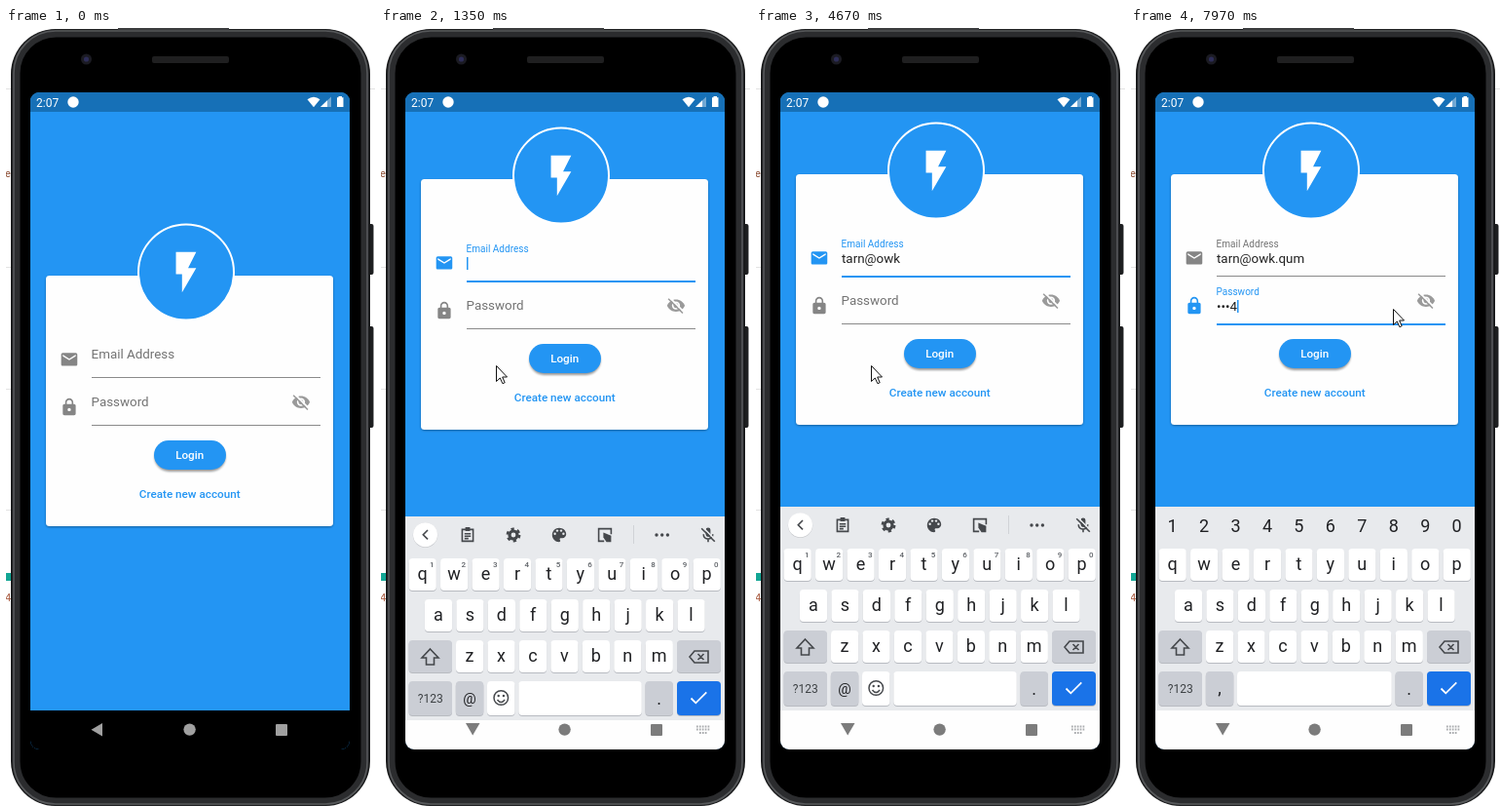
An HTML page for the animation above (8 s loop, 379x798 px).

```html
<!DOCTYPE html>
<html lang="en">
<head>
<meta charset="utf-8">
<title>Login form</title>
<style>
  html, body { margin: 0; width: 100%; height: 100%; overflow: hidden; background: #fff; }
  svg { display: block; width: 379px; height: 798px; font-family: Roboto, "Noto Sans", sans-serif; }
  .mid { text-anchor: middle; }
  .field { font-size: 13.36px; }
  .btn { font-size: 11.7px; font-weight: 500; }
  .key { font-size: 18px; fill: #202124; }
  .hint { font-size: 8px; font-weight: 500; fill: #5f6368; }
  .tool { fill: #45484c; }
  .line { fill: none; stroke: #45484c; stroke-width: 2; }
</style>
</head>
<body>
<svg viewBox="0 0 379 798">
  <defs>
    <clipPath id="screen"><rect x="25" y="66" width="328" height="674" rx="9"/></clipPath>
    <filter id="soft" x="-20%" y="-20%" width="140%" height="160%"><feGaussianBlur stdDeviation="1.1"/></filter>
  </defs>

  <!-- page behind the phone -->
  <path d="M0 62.5H379M0 245.5H8M0 370.5H8M0 494.5H8" stroke="#e2e2e2"/>
  <rect y="559" width="7" height="8" fill="#12a594"/>
  <text x="-1" y="153" font-size="11" fill="#8a4a30">e</text>
  <text x="-1" y="588" font-size="11" fill="#a4553a">4</text>

  <!-- phone -->
  <rect x="371" y="201" width="6.5" height="52" rx="2" fill="#1d1e20"/>
  <rect x="371" y="306" width="6.5" height="104" rx="2" fill="#1d1e20"/>
  <rect x="5" y="1" width="369" height="797" rx="46" fill="#161718"/>
  <rect x="10.5" y="5.5" width="358" height="788" rx="41" fill="#000" stroke="#2b2c2e" stroke-width="8"/>
  <rect x="8" y="3" width="363" height="793" rx="43" fill="none" stroke="#56585a" stroke-width="1.6"/>
  <rect x="115" y="0" width="114" height="2" fill="#3a3b3d"/>
  <rect x="150" y="29" width="79" height="7" rx="2" fill="#1f1f20"/>
  <circle cx="82.5" cy="32" r="5.5" fill="#1b1b22"/>
  <circle cx="82.5" cy="32" r="2.6" fill="#2d2d58"/>

  <g clip-path="url(#screen)">
    <rect x="25" y="66" width="328" height="674" fill="#2395f3"/>
    <rect x="25" y="66" width="328" height="20" fill="#1670b7"/>
    <g fill="#fff">
      <text x="31" y="80.5" font-size="12">2:07</text>
      <circle cx="69" cy="76" r="5.7"/>
      <path d="M309.5 73.3Q316 68 322.5 73.3L316 81.3Z"/>
      <path d="M334 70.5V81H323Z" opacity=".4"/>
      <path d="M330 74.3V81H323Z"/>
      <path d="M341.5 71.2V70H345V71.2H346.5V81H340V71.2Z"/>
    </g>

    <g id="form">
      <rect x="41" y="255" width="295" height="257" rx="4" fill="#000" opacity=".35" filter="url(#soft)"/>
      <rect x="41" y="254" width="295" height="257" rx="3.5" fill="#fefefe"/>
      <circle cx="185" cy="250.5" r="49" fill="#2395f3" stroke="#fff" stroke-width="2"/>
      <path transform="translate(160 225.5) scale(2.08)" fill="#fff" d="M7 2v11h3v9l7-12h-4l4-8z"/>
      <g id="fields"></g>
      <g transform="translate(293 373.7) scale(.83)">
        <path fill="#9a9a9a" d="M1 12c1.73-4.39 6-7.5 11-7.5s9.27 3.11 11 7.5c-1.73 4.39-6 7.5-11 7.5s-9.27-3.11-11-7.5z"/>
        <circle cx="12" cy="12" r="5" fill="#fefefe"/>
        <circle cx="12" cy="12" r="3" fill="#9a9a9a"/>
        <path d="M4 2L22 20" stroke="#fefefe" stroke-width="2.2"/>
        <path d="M2.6 3.6L20.4 21.4" stroke="#9a9a9a" stroke-width="1.9"/>
      </g>
      <rect x="152.5" y="425" width="73" height="30" rx="15" fill="#000" opacity=".4" filter="url(#soft)"/>
      <rect x="152" y="423" width="74" height="30" rx="15" fill="#2395f3"/>
      <text class="btn mid" x="188.7" y="442.2" fill="#fff">Login</text>
      <text class="btn mid" x="188.7" y="482.2" fill="#2395f3">Create new account</text>
    </g>

    <rect x="25" y="700" width="328" height="40" fill="#000"/>
    <g id="board"></g>
    <g id="nav">
      <path id="back" d="M99 713V726.5L87.500 719.800Z"/>
      <path id="down" d="M87 713H101.500L94.200 725.500Z"/>
      <circle cx="188.600" cy="719.600" r="6.200"/>
      <rect x="277" y="714" width="12" height="12" rx="1"/>
      <path id="switch" d="M324 716.500H338M324 719.500H338M327 723H335" fill="none" stroke="#a9abae" stroke-width="1.800" stroke-dasharray="1.700 1.200"/>
    </g>
  </g>

  <path id="mouse" d="M.5 .5V16.500L4.300 13 6.900 18.700 9.200 17.700 6.700 12H11.500Z" fill="#fff" stroke="#111"/>
</svg>

<script>
const $ = id => document.getElementById(id);
const BLUE = '#2395f3', GRAY = '#858585';

// ---- form fields ----
const mail = 'M20 4H4c-1.1 0-2 .9-2 2v12c0 1.1.9 2 2 2h16c1.1 0 2-.9 2-2V6c0-1.1-.9-2-2-2zm0 4l-8 5-8-5V6l8 5 8-5v2z';
const lock = 'M18 8h-1V6c0-2.76-2.24-5-5-5S7 3.24 7 6v2H6c-1.1 0-2 .9-2 2v10c0 1.1.9 2 2 2h12c1.1 0 2-.9 2-2V10c0-1.1-.9-2-2-2z' +
  'm-6 9c-1.1 0-2-.9-2-2s.9-2 2-2 2 .9 2 2-.9 2-2 2zm3.1-9H8.9V6c0-1.71 1.39-3.1 3.1-3.1s3.1 1.390 3.1 3.1v2z';

const field = (id, label, icon, y) => `<g transform="translate(0 ${y})">
  <path id="${id}Icon" transform="translate(55 330) scale(.83)" d="${icon}"/>
  <text id="${id}Label" class="field">${label}</text>
  <text id="${id}Value" class="field" x="88" y="345.3" fill="#212121"></text>
  <rect id="${id}Caret" y="334" width="1.500" height="13" fill="${BLUE}"/>
  <rect id="${id}Line" x="88" y="358" width="235"/></g>`;
$('fields').innerHTML = field('email', 'Email Address', mail, 0) + field('pass', 'Password', lock, 49);

// ---- keyboard ----
const PITCH = 32.45, SOFT = '#cbced5';
const key = (x, y, w, fill = '#fff', h = 33) =>
  `<rect x="${x}" y="${y + 1}" width="${w}" height="${h}" rx="4" fill="#b8bbc1"/>
   <rect x="${x}" y="${y}" width="${w}" height="${h}" rx="4" fill="${fill}"/>`;
const text = (cls, x, y, s, extra = '') => `<text class="${cls} mid" x="${x}" y="${y}" ${extra}>${s}</text>`;
const row = (letters, x0, y) => [...letters].map((c, i) => {
  const x = x0 + i * PITCH;
  return key(x - 14, y, 28.2) + text('key', x, y + 22, c);
}).join('');
const tool = (x, body) => `<g transform="translate(${x - 9.6} 500.4) scale(.8)">${body}</g>`;
const dots = (pts, r, fill) => pts.map(([x, y]) => `<circle cx="${x}" cy="${y}" r="${r}" fill="${fill}"/>`).join('');

const clipboard = `<path class="line" d="M5 5H19V20H5Z"/><path class="tool" d="M9 2H15V7H9Z"/>
  <path class="line" d="M8 10.500H16M8 13.500H16M8 16.500H13" stroke-width="1.500"/>`;
const gear = `<circle class="line" cx="12" cy="12" r="5" style="stroke-width:4"/>
  <circle class="line" cx="12" cy="12" r="7.800" style="stroke-width:3" stroke-dasharray="4.100 4.068"/>`;
const palette = `<path class="tool" d="M12 3c-4.970 0-9 4.030-9 9s4.030 9 9 9c.83 0 1.500-.67 1.500-1.500 0-.39-.15-.74-.39-1.010-.23-.26-.38-.61-.38-.99 0-.83.67-1.500 1.500-1.500H16c2.760 0 5-2.240 5-5 0-4.420-4.030-8-9-8z"/>` +
  dots([[6.5, 10.5], [9.5, 6.5], [14.5, 6.5], [17.5, 10.5]], 1.5, '#e8eaed');
const sticker = `<path class="line" d="M11 20H4V4H20V11"/><path class="tool" d="M10 9L20 13V21H14L10 15Z"/>`;
const mic = `<rect class="tool" x="9" y="2.500" width="6" height="12" rx="3"/>
  <path class="line" d="M6 11C6 19 18 19 18 11M12 17V21"/>
  <path d="M5 2L22 19" stroke="#e8eaed" stroke-width="2"/><path class="line" d="M3.500 3.500L20.500 20.500"/>`;

const letters = 'qwertyuiop';
const digit = i => (i + 1) % 10;
$('board').innerHTML = `
  <rect x="25" y="491" width="328" height="209" fill="#e8eaed"/>
  <rect x="25" y="700" width="328" height="60" fill="#fefefe"/>
  ${row(letters, 42.6, 534)}${row('asdfghjkl', 58.900, 576)}${row('zxcvbnm', 91, 618)}
  ${key(28.5, 618, 44.5, SOFT)}${key(304, 618, 45, SOFT)}
  <path class="line" style="stroke-width:1.600" d="M50.500 635.500m0-8.500l8.500 9h-4.500v7h-8v-7h-4.500z"/>
  <path class="line" style="stroke-width:1.600" d="M322 629H336V641H322L317 635ZM325.500 632l6 6m0-6l-6 6"/>
  ${key(28.5, 660, 44.5, SOFT, 35)}${text('', 50.7, 682, '?123', 'font-size="12" fill="#3c4043"')}
  ${key(76.8, 660, 28.5, SOFT, 35)}${key(271.500, 660, 28.5, SOFT, 35)}${text('key', 285.7, 684, '.')}
  ${key(304, 660, 45, '#1a73e8', 35)}
  <path d="M318.500 677.500l4.800 4.800 11-11" fill="none" stroke="#fff" stroke-width="1.800"/>
  <g id="emailKeys">
    ${[...letters].map((c, i) => text('hint', 52.3 + i * PITCH, 543, digit(i))).join('')}
    <circle cx="45.500" cy="510.300" r="12.700" fill="#c9cbcf"/><circle cx="45.500" cy="509.700" r="12.500" fill="#fff"/>
    <path id="chevron" class="line" style="stroke-width:1.600"/>
    <g id="tools">
      ${tool(89, clipboard)}${tool(136, gear)}${tool(183, palette)}${tool(230, sticker)}
      <path d="M259.500 500V519" stroke="#d0d3d7"/>
      ${dots([[283, 510], [288.7, 510], [294.4, 510]], 1.7, '#45484c')}
    </g>
    ${text('', 188, 515, '', 'id="hintWord" font-size="14" fill="#303236"')}
    ${tool(336, mic)}
    ${text('', 91, 683, '@', 'font-size="15" fill="#202124"')}
    ${key(109, 660, 28.5, '#fff', 35)}${key(141.300, 660, 126.500, '#fff', 35)}
    <circle class="line" cx="123.300" cy="677" r="7.300" style="stroke-width:1.500"/>
    ${dots([[120.7, 675], [125.9, 675]], 1.2, '#45484c')}
    <path class="line" style="stroke-width:1.500" d="M119.500 679Q123.300 684 127.100 679"/>
  </g>
  <g id="passKeys">
    ${[...letters].map((c, i) => text('key', 42.6 + i * PITCH, 517.3, digit(i))).join('')}
    ${text('key', 91, 683, ',')}${key(109, 660, 158.800, '#fff', 35)}
  </g>`;

// ---- timeline: each entry changes part of the state and holds ----
const ADDRESS = 'tarn@owk.qum';
const typed = (n, more) => ({ email: n, caret: 1, ...more });
const at = (x, y, more) => ({ mouse: [x, y], ...more });
const start = { mouse: null, focus: '', top: 700, float: { email: 0, pass: 0 }, email: 0, pass: '', caret: 0, word: 0, numbers: 0 };
const steps = [
  [370, at(59, 321)], [490, at(103, 341)], [610, at(118, 346)],
  [1110, { focus: 'email', caret: 1, float: { email: .5, pass: 0 } }],
  [1230, { top: 685, float: { email: 1, pass: 0 } }],
  [1350, { top: 501 }], [1470, { top: 491 }],
  [1970, { caret: 0 }],
  [2470, typed(1, { word: 1 })], [2590, typed(2)], [2710, { word: 2 }], [2830, typed(3, { word: 3 })],
  [3080, typed(4)], [3200, { word: 4 }],
  [3450, typed(5)], [3570, { word: 0 }],
  [3820, typed(6)], [4060, typed(7)], [4180, typed(8)], [4670, { caret: 0 }],
  [4790, typed(9)], [5040, typed(10)], [5160, typed(11)], [5400, typed(12)], [5900, { caret: 0 }],
  [6270, at(156, 302)], [6390, at(165, 289, { caret: 1 })],
  [6640, { focus: 'pass', float: { email: 1, pass: .5 } }],
  [6760, { float: { email: 1, pass: 1 } }],
  [6880, { numbers: 1 }],
  [7120, { pass: '1' }], [7240, at(190, 288)], [7360, at(232, 288, { pass: '•2' })],
  [7480, at(260, 288, { pass: '••3' })], [7600, at(269, 288)],
  [7970, { pass: '•••4' }]
];

const set = (id, attrs) => { for (const k in attrs) $(id).setAttribute(k, attrs[k]); };
const show = (id, on) => set(id, { visibility: on ? 'visible' : 'hidden' });

function drawField(id, value, s) {
  const on = s.focus === id, f = s.float[id];
  set(id + 'Icon', { fill: on ? BLUE : GRAY });
  set(id + 'Line', { fill: on ? BLUE : '#8a8a8a', height: on ? 2 : 1 });
  set(id + 'Label', {
    fill: on ? BLUE : '#737373',
    transform: `translate(87.6 ${338.8 - 10.3 * f}) scale(${1 - .25 * f})`
  });
  const box = $(id + 'Value');
  box.textContent = value;
  set(id + 'Caret', { x: 88 + (value ? box.getComputedTextLength() : 0) });
  show(id + 'Caret', on && s.caret);
}

function draw(s) {
  const up = s.top < 700, rising = up && s.top > 600;
  set('form', { transform: `translate(0 ${-Math.floor((700 - s.top) / 2)})` });
  drawField('email', ADDRESS.slice(0, s.email), s);
  drawField('pass', s.pass, s);

  $('board').style.display = up ? '' : 'none';
  set('board', { transform: `translate(0 ${s.top - 491})` });
  $('emailKeys').style.display = s.numbers ? 'none' : '';
  $('passKeys').style.display = s.numbers ? '' : 'none';
  $('tools').style.display = s.word ? 'none' : '';
  $('hintWord').textContent = ADDRESS.slice(0, s.word);
  set('chevron', { d: s.word ? 'M43.500 505l4.700 4.700-4.700 4.700' : 'M48 505l-4.700 4.700 4.700 4.700' });

  set('nav', { fill: rising ? '#c3c5c8' : up ? '#7c7c7c' : '#a0a0a0' });
  show('back', !up || rising);
  show('down', up && !rising);
  show('switch', up);

  show('mouse', s.mouse);
  if (s.mouse) set('mouse', { transform: `translate(${s.mouse})` });
}

let last = -1;
const origin = performance.now();
function tick() {
  const t = (performance.now() - origin) % 8000;
  const past = steps.filter(([time]) => time <= t);
  if (past.length !== last) {
    last = past.length;
    draw(Object.assign({}, start, ...past.map(step => step[1])));
  }
  requestAnimationFrame(tick);
}
tick();
</script>
</body>
</html>
```
